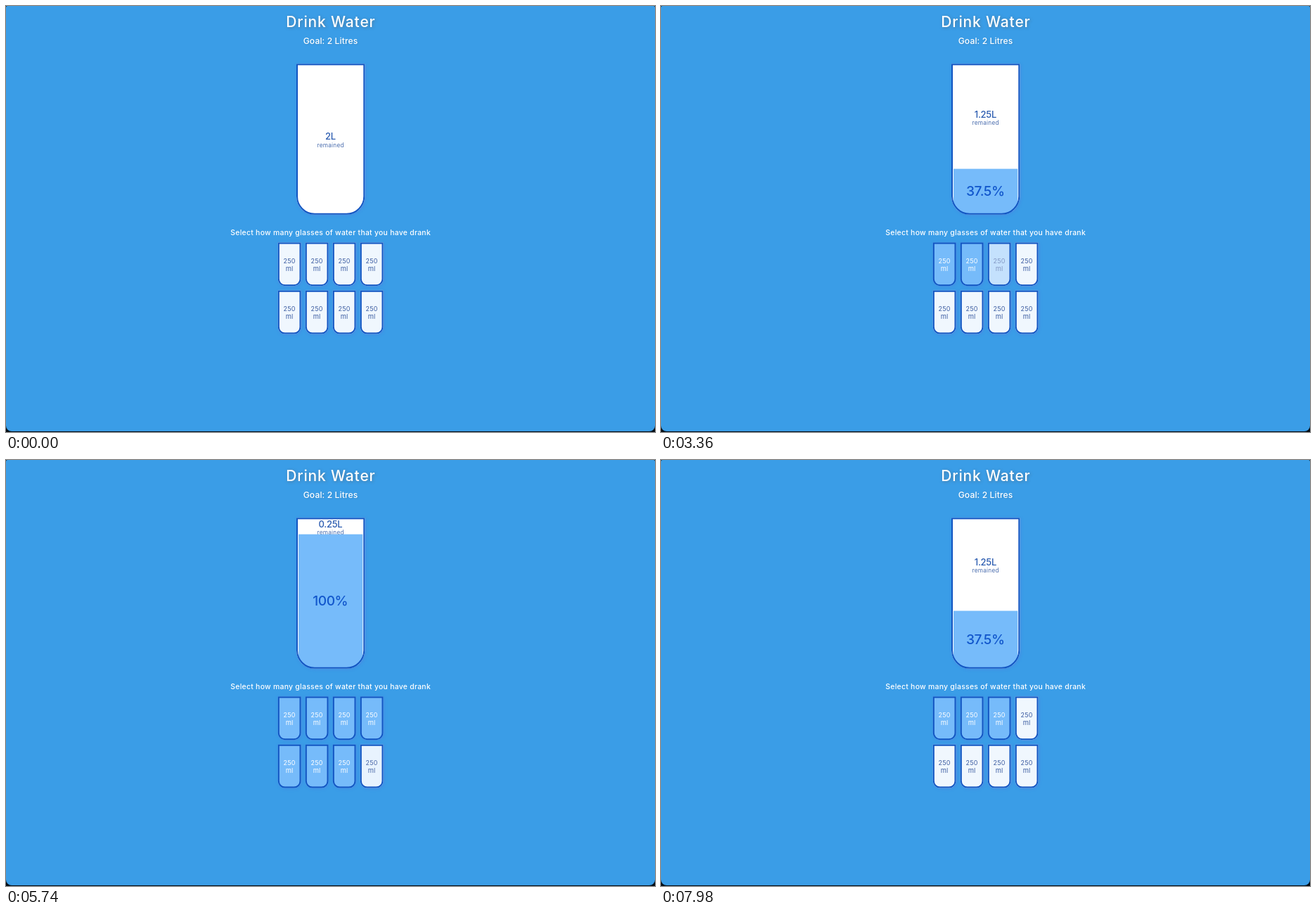
Write an HTML page with a canvas that moves like this. It is 923 by 606 pixels and loops after 8000 ms.

```html
<!DOCTYPE html>
<html lang="en">
<head>
<meta charset="utf-8">
<title>Drink Water</title>
<style>
  html, body { margin: 0; width: 923px; height: 606px; overflow: hidden; background: #060e16; }
  canvas { display: block; }
</style>
</head>
<body>
<canvas id="stage" width="923" height="606"></canvas>
<script>
const ctx = document.getElementById('stage').getContext('2d');
const LOOP = 8000, DURATION = 300, TOTAL = 8, CENTER = 461.5;
const BORDER = '#1155c2';
const WATER = [118, 187, 250], EMPTY = [240, 247, 254];
const INK = [62, 94, 162], WHITE = [255, 255, 255];
// Inside of the big cup
const TOP = 84.6, BOTTOM = 295, FULL = 214.5, LABEL_HEIGHT = 24.8;
// [time of click, glasses drunk]
const clicks = [[0, 0], [1600, 1], [2460, 2], [3292, 3], [4800, 7], [5718, 8], [7093, 3]];

const lerp = (a, b, p) => a + (b - a) * p;
const mix = (a, b, p) => `rgb(${a.map((v, i) => Math.round(lerp(v, b[i], p)))})`;

// CSS "ease": cubic-bezier(.25, .1, .25, 1)
function ease(x) {
  if (x >= 1) return 1;
  const bezier = (a, b, s) => 3 * a * s * (1 - s) ** 2 + 3 * b * s * s * (1 - s) + s ** 3;
  let low = 0, high = 1;
  for (let i = 0; i < 24; i++) {
    const mid = (low + high) / 2;
    if (bezier(.25, .25, mid) < x) low = mid; else high = mid;
  }
  return bezier(.1, 1, low);
}

function setShadow(color, blur = 0, offset = 0) {
  ctx.shadowColor = color;
  ctx.shadowBlur = blur;
  ctx.shadowOffsetX = ctx.shadowOffsetY = offset;
}

function text(str, x, y, size, color, weight = 500, spacing = .027) {
  ctx.font = `${weight} ${size}px Inter, sans-serif`;
  ctx.letterSpacing = `${spacing * size}px`;
  ctx.textAlign = 'center';
  ctx.fillStyle = color;
  ctx.fillText(str, x + spacing * size / 2, y);
}

function cup(x, y, w, h, radius, fill, drawInside) {
  ctx.beginPath();
  ctx.roundRect(x, y, w, h, [0, 0, radius, radius]);
  ctx.fillStyle = fill;
  setShadow('rgba(85, 115, 225, .4)', 4, 1);
  ctx.fill();
  setShadow('transparent');
  ctx.save();
  ctx.clip();
  drawInside();
  ctx.restore();
  ctx.beginPath();
  ctx.roundRect(x + 1, y + 1, w - 2, h - 2, [0, 0, radius - 1, radius - 1]);
  ctx.strokeStyle = BORDER;
  ctx.lineWidth = 2;
  ctx.stroke();
}

function drawBigCup(from, to, p) {
  const room = BOTTOM - TOP - (to === TOTAL ? 0 : LABEL_HEIGHT);
  const height = Math.min(lerp(from, to, p) / TOTAL * FULL, room);
  const surface = BOTTOM - height;
  cup(413, 82.3, 97.3, 214.5, 26, '#fff', () => {
    if (to < TOTAL || p < 1) {
      const litres = 2 - (to === TOTAL ? from : to) / 4;
      const middle = (TOP + surface) / 2;
      text(`${litres}L`, CENTER, middle + .5, 13, '#2a5bb0', 500, -.02);
      text('remained', CENTER, middle + 10.8, 8.3, '#4a6dae', 400);
    }
    if (to === 0) return;
    ctx.fillStyle = `rgb(${WATER})`;
    ctx.fillRect(416, surface, 91.3, height + 1);
    text(`${to / TOTAL * 100}%`, CENTER, surface + height / 2 + 7, 19.2, '#1257cc', 500, -.025);
  });
}

function drawGlass(i, level) {
  const x = 386.8 + i % 4 * 39, y = 336.4 + Math.floor(i / 4) * 68.3;
  const ink = mix(INK, WHITE, level);
  cup(x, y, 32.7, 61.8, 9.75, mix(EMPTY, WATER, level), () => {
    text('250', x + 16.2, y + 29.3, 9, ink, 400);
    text('ml', x + 16.2, y + 40.1, 9.4, ink, 400);
  });
}

function draw(t) {
  const last = clicks.findLastIndex(([time]) => time <= t);
  const [time, to] = clicks[last];
  const from = last ? clicks[last - 1][1] : 0;
  const p = ease((t - time) / DURATION);

  ctx.clearRect(0, 0, 923, 606);
  ctx.fillStyle = '#3a9de7';
  ctx.beginPath();
  ctx.roundRect(0, 0, 923, 605, [2, 2, 8, 8]);
  ctx.fill();

  setShadow('rgba(90, 85, 80, .45)', 4, 1);
  text('Drink Water', CENTER, 30.4, 21, '#fff', 500, .04);
  setShadow('rgba(60, 80, 110, .2)', 2, 1);
  text('Goal: 2 Litres', CENTER, 53.8, 12.1, '#fff', 500, .01);
  setShadow('transparent');
  text('Select how many glasses of water that you have drank', CENTER, 326.4, 10.4, '#fff');

  drawBigCup(from, to, p);
  for (let i = 0; i < TOTAL; i++) drawGlass(i, lerp(i < from, i < to, p));
}

function tick() {
  draw(performance.now() % LOOP);
  requestAnimationFrame(tick);
}
tick();
</script>
</body>
</html>
```
